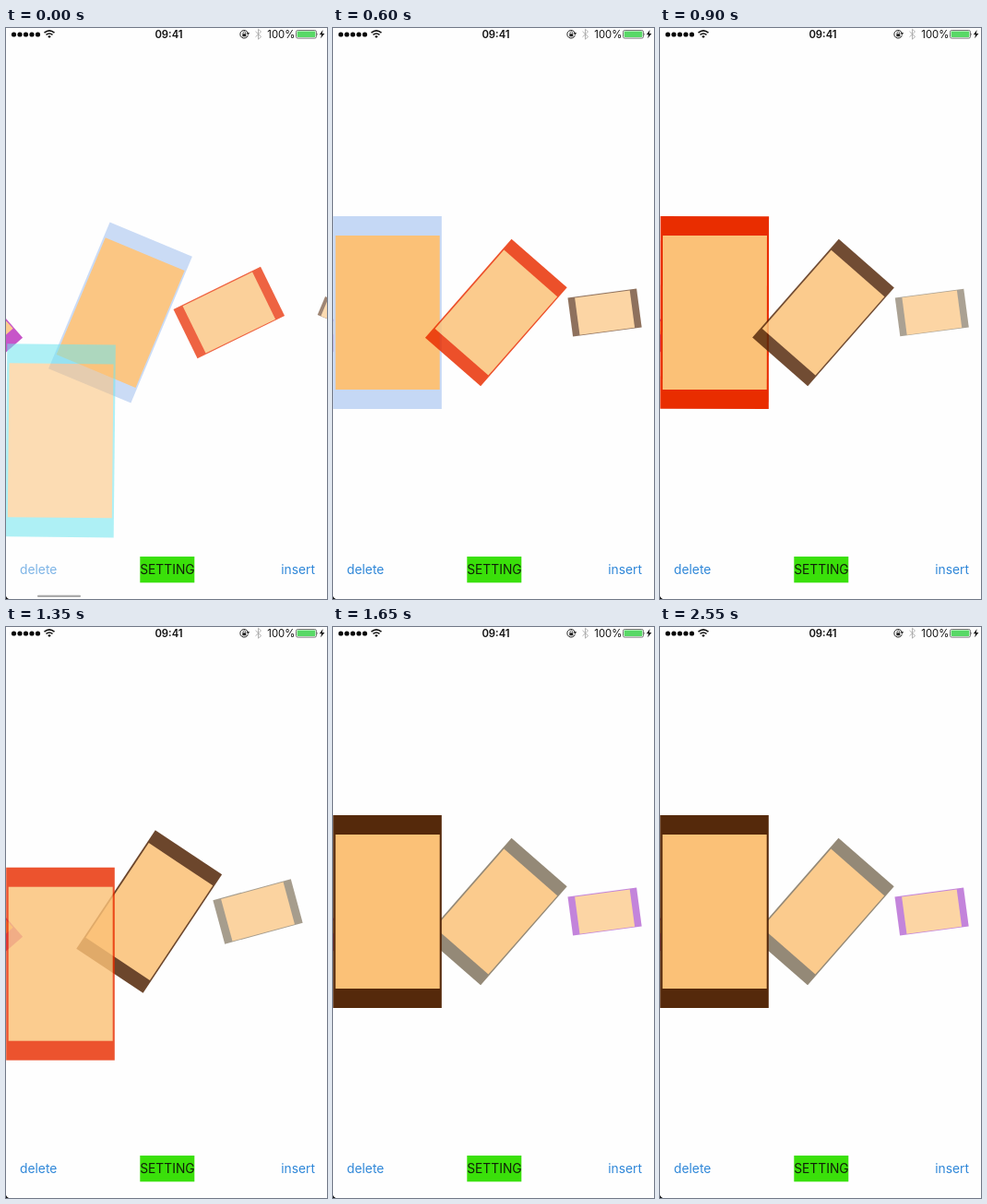
Recreate the animation shown at these times as an HTML page. Size 348x619 px, loop 2950 ms.

```html
<!DOCTYPE html>
<html lang="en">
<head>
<meta charset="utf-8">
<title>Card deck</title>
<style>
  html, body { margin: 0; width: 100%; height: 100%; overflow: hidden; background: #fefefe; }
  svg { display: block; width: 100%; height: 100%; }
  text { font-family: Inter, Roboto, sans-serif; }
  .button { font-size: 13.8px; }
  .link { fill: #2f87d8; }
  .status { font-size: 11.3px; fill: #111; }
</style>
</head>
<body>
<svg viewBox="0 0 348 619">
  <g id="deck"></g>

  <g id="status">
    <g fill="#050505">
      <circle cx="8.5" cy="7" r="2.6"/><circle cx="15" cy="7" r="2.6"/><circle cx="21.5" cy="7" r="2.6"/>
      <circle cx="28" cy="7" r="2.6"/><circle cx="34.5" cy="7" r="2.6"/>
      <path d="M45.2 9 Q47 7.4 48.8 9 L47 11z"/>
    </g>
    <path d="M41.5 5.2Q47 .6 52.5 5.2M43.5 7.4Q47 4.5 50.5 7.4" fill="none" stroke="#111" stroke-width="1.5"/>
    <text class="status" x="176.5" y="11" text-anchor="middle" font-weight="600">09:41</text>
    <path d="M262.2 8.2A4.3 4.3 0 1 1 262.3 5.6" fill="none" stroke="#222"/>
    <path d="M260.6 5.3h3.6l-1.8 2.4zM256.3 6.2h4v3h-4z" fill="#222"/>
    <path d="M257 6.3V5.2a1.3 1.3 0 0 1 2.6 0v1.1" fill="none" stroke="#222" stroke-width=".7"/>
    <path d="M270.5 3.8l6 5.7-3 2.7V1.3l3 2.7-6 5.7" fill="none" stroke="#aaa" stroke-width=".9"/>
    <text class="status" x="283.3" y="11" textLength="">100%</text>
    <rect x="314.5" y="2.5" width="22" height="8.6" rx="1.8" fill="#fff" stroke="#555" stroke-width=".8"/>
    <rect x="315.6" y="3.6" width="19.8" height="6.4" rx=".8" fill="#58d866"/>
    <path d="M337.3 5.2q1.4 1.6 0 3.2z" fill="#555"/>
    <path d="M343.6 2l-3.8 5.3h2.3l-1 4 4.3-5.4h-2.6z" fill="#111"/>
  </g>

  <text id="delete" class="button link" x="15" y="592">delete</text>
  <rect x="145.3" y="573" width="59" height="28.3" fill="#3ae00a"/>
  <text class="button" x="174.9" y="592" text-anchor="middle" fill="#102008">SETTING</text>
  <text class="button link" x="335" y="592" text-anchor="end">insert</text>
  <rect id="grabber" x="34" y="614.7" width="47" height="2.3" rx="1.1" fill="#aaa"/>
  <path d="M0 616Q.8 618.2 3 619H0z" fill="#111"/>
</svg>

<script>
const LOOP = 2950, STEP = 150, LAST = 2550, DURATION = 300;
const COLORS = ['#6fe6ef', '#c5d8f5', '#e92d00', '#55290b', '#7f725c', '#a546ca'];
const STARTS = [-141, 609, 1261];
const deck = document.getElementById('deck');
const deleteLabel = document.getElementById('delete');
const grabber = document.getElementById('grabber');

function makeCard(color) {
  const card = document.createElementNS('http://www.w3.org/2000/svg', 'g');
  card.innerHTML = `<rect x="-58.8" y="-104.5" width="117.6" height="209" fill="${color}"/>
    <rect x="-56.3" y="-83.5" width="113" height="167" fill="#fbc177"/>`;
  deck.append(card);
  return card;
}

// Ease-in-out, cubic-bezier(.42, 0, .58, 1)
function ease(u) {
  if (u <= 0) return 0;
  if (u >= 1) return 1;
  let low = 0, high = 1, s;
  for (let i = 0; i < 20; i++) {
    s = (low + high) / 2;
    const x = 1.26 * s * (1 - s) ** 2 + 1.74 * s * s * (1 - s) + s ** 3;
    if (x < u) low = s; else high = s;
  }
  return s * s * (3 - 2 * s);
}

// slot 0 is the front card; neighbours turn, shrink and fade with distance
function place(card, slot, drop = 0, tilt = 0) {
  const distance = Math.abs(slot);
  const angle = 41.2 * slot + 14 * Math.max(0, slot - 2) + tilt;
  const scale = Math.max(0, 1 - 0.32 * distance);
  card.setAttribute('transform',
    `translate(${59 + 117.8 * slot} ${308.5 + 309.5 * drop}) rotate(${angle}) scale(${scale})`);
  card.setAttribute('opacity', (1 - 0.17 * distance) * (1 - drop));
}

const previous = makeCard('#bc34bf');
place(previous, -1);
const cards = COLORS.map(makeCard);

function draw(t) {
  const drops = STARTS.map(start => ease((t - start) / DURATION));
  const moved = drops.reduce((sum, p) => sum + p, 0);
  cards.forEach((card, i) =>
    place(card, Math.max(0, i - moved), drops[i] || 0, i ? 0 : 0.6));

  for (let i = cards.length - 1; i >= 0; i--) deck.append(cards[i]);
  const front = Math.round(moved);
  const resting = Math.abs(moved - front) < 0.02;
  if (resting && front < STARTS.length) deck.append(cards[front + 1]);

  deleteLabel.setAttribute('opacity', Math.min(1, 0.62 + t / 900));
  grabber.setAttribute('opacity', Math.max(0, 1 - t / 300));
}

let shown = -1;
function tick(now) {
  const t = Math.min(LAST, Math.floor(now % LOOP / STEP) * STEP);
  if (t !== shown) draw(shown = t);
  requestAnimationFrame(tick);
}
draw(0);
requestAnimationFrame(tick);
</script>
</body>
</html>
```
